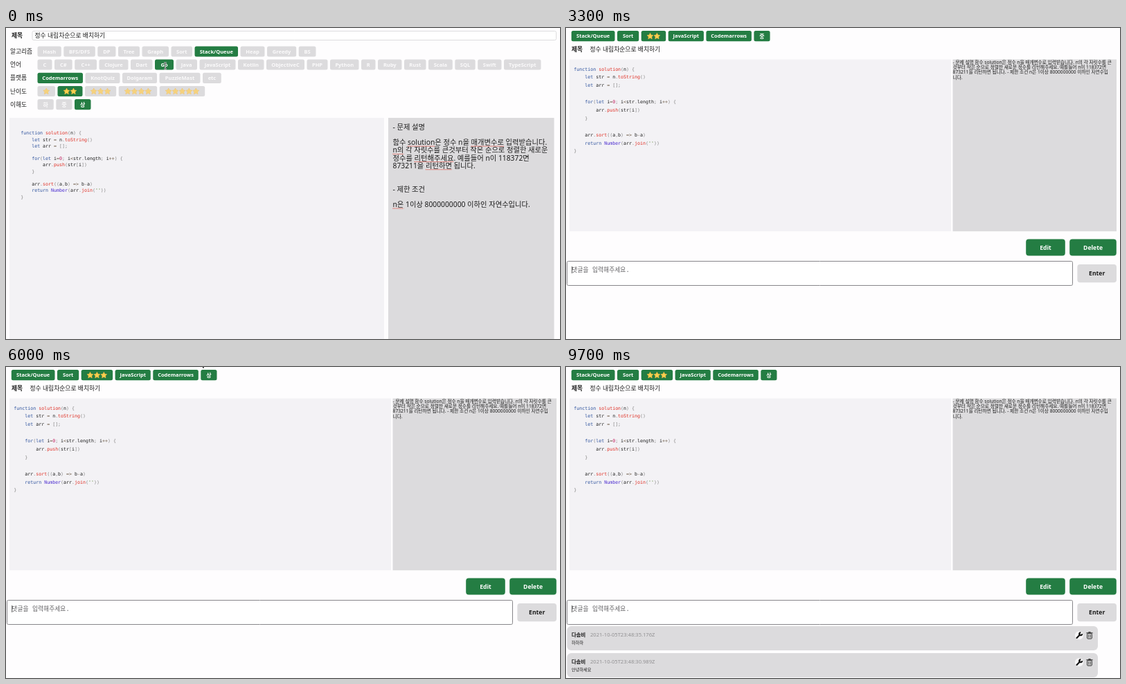
Recreate the animation shown at these times as an HTML page with a canvas. Size 800 by 450 pixels, loop 9.8 s.

```html
<!DOCTYPE html>
<html lang="ko">
<head>
<meta charset="utf-8">
<title>문제 풀이 노트</title>
<style>
html, body { margin: 0; width: 100%; height: 100%; overflow: hidden; background: #fefdfe; }
canvas { display: block; width: 800px; height: 450px; }
</style>
</head>
<body>
<canvas id="stage"></canvas>
<script>
const canvas = document.getElementById('stage');
const ctx = canvas.getContext('2d');
const dpr = window.devicePixelRatio || 1;
canvas.width = 800 * dpr;
canvas.height = 450 * dpr;

const LOOP = 9800, STEP = 100;
const SANS = '"Noto Sans", "Noto Sans CJK KR", sans-serif';
const MONO = '"DejaVu Sans Mono", "Noto Sans CJK KR", monospace';
const GREEN = '#247d43', GRAY = '#dcdbdd', PALE = '#f3f2f5', PAGE = '#fefdfe', INK = '#1c1c1c';
const TITLE = '정수 내림차순으로 배치하기';
const SITE = 'Codemarrows', USER = '다솜비';

// Each row: label, centre y, items, left edges (the last one closes the row)
const GAP = 3.5;
const ROWS = [
  ['알고리즘', 34, 'Hash BFS/DFS DP Tree Graph Sort Stack/Queue Heap Greedy BS'.split(' '),
    [45.5, 83.3, 132.3, 162, 196.5, 238.5, 272.5, 338.5, 377, 422.7, 451]],
  ['언어', 53, 'C C# C++ Clojure Dart Go Java JavaScript Kotlin ObjectiveC PHP Python R Ruby Rust Scala SQL Swift TypeScript'.split(' '),
    [45.5, 70, 99.2, 134.5, 180, 215, 245.5, 279.5, 335, 376, 434.5, 468, 513, 537, 575, 610, 648.3, 681.2, 719, 776]],
  ['플랫폼', 72.3, [SITE, 'KnotQuiz', 'Dolgaram', 'PuzzleMast', 'etc'],
    [45.5, 114.5, 168, 221.5, 284, 314.3]],
  ['난이도', 91.5, [1, 2, 3, 4, 5], [45.5, 74.5, 114, 162.7, 221.7, 290.7]],
  ['이해도', 110.7, ['하', '중', '상'], [45.5, 72.3, 99, 126]]
];

const CODE = [
  'function solution(n) {', '    let str = n.toString()', '    let arr = [];', '',
  '    for(let i=0; i<str.length; i++) {', '        arr.push(str[i])', '    }', '',
  '    arr.sort((a,b) => b-a)', "    return Number(arr.join(''))", '}'
];
const TOKEN = /\b(function|let|for|return)\b|(Number)|(\w+(?=\())|(\d+)|('')|([{}()\[\];,.])|([=<>+-]+)|\w+/g;
const TOKEN_COLORS = ['#31559f', '#4a2bd0', '#e02f24', '#c2205e', '#4a7a20', '#858585', '#6e5c48'];

const NOTE = [
  '- 문제 설명', '', '함수 solution은 정수 n을 매개변수로 입력받습니다.',
  'n의 각 자릿수를 큰것부터 작은 순으로 정렬한 새로운',
  '정수를 리턴해주세요. 예를들어 n이 118372면', '873211을 리턴하면 됩니다.', '', '',
  '- 제한 조건', '', 'n은 1이상 8000000000 이하인 자연수입니다.'
];
const MISSPELT = [[2, 'solution'], [2, '매개변수로'], [3, 'n의'], [4, '리턴해주세요'], [5, '리턴하면'], [10, 'n은']];
const SUMMARY = [
  '- 문제 설명 함수 solution은 정수 n을 매개변수로 입력받습니다. n의 각 자릿수를 큰',
  '것부터 작은 순으로 정렬한 새로운 정수를 리턴해주세요. 예를들어 n이 118372면',
  '873211을 리턴하면 됩니다. - 제한 조건 n은 1이상 8000000000 이하인 자연수입', '니다.'
];

const HELLO = ['ㅇ', '아', '안', '안ㄴ', '안녀', '안녕', '안녕ㅎ', '안녕하', '안녕핫', '안녕하세', '안녕하셍', '안녕하세요'];
const LAUGH = ['ㅎ', '하', '핳', '하하', '하핳', '하하하'];

// Pointer tracks: [time, x, y, shape]
const TRACKS = [
  [[0, 230, 55, 'beam'], [200, 230, 55, 'beam'], [500, 304, 54, 'beam'], [700, 304, 54, 'beam'],
    [1000, 254, 35, 'beam'], [1200, 254, 35, 'beam'], [1500, 84, 112, 'beam'], [1700, 84, 112, 'beam'],
    [2200, 628, 236, 'beam'], [2500, 628, 236, 'beam'], [3000, 700, 188, 'beam']],
  [[3600, 700, -14, 'arrow'], [4000, 692, 319, 'hand'], [4200, 692, 319, 'hand']],
  [[4300, 682, 313, 'beam'], [4400, 682, 313, 'beam'], [4700, 137, 92, 'beam'], [4800, 137, 92, 'beam'],
    [5000, 111, 111, 'arrow'], [5100, 230, 10, 'arrow']],
  [[5700, 280, -16, 'arrow'], [6000, 281, -8.6, 'arrow'], [6200, 285, -16, 'arrow']],
  [[7200, 560, 250, 'arrow'], [7400, 779, 358, 'hand'], [8500, 779, 358, 'hand']]
];

function write(str, x, y, size, color = INK, opt = {}) {
  ctx.font = (opt.bold ? 'bold ' : '') + size + 'px ' + (opt.font || SANS);
  ctx.textAlign = opt.align || 'left';
  ctx.fillStyle = color;
  ctx.fillText(str, x, y + size * 0.36);
}

function widthOf(str, size, font = SANS) {
  ctx.font = size + 'px ' + font;
  return ctx.measureText(str).width;
}

function rect(x, y, w, h, color) {
  ctx.fillStyle = color;
  ctx.fillRect(x, y, w, h);
}

function box(x, y, w, h, r, fill, stroke) {
  ctx.beginPath();
  ctx.roundRect(x, y, w, h, r);
  if (fill) { ctx.fillStyle = fill; ctx.fill(); }
  if (stroke) { ctx.strokeStyle = stroke; ctx.lineWidth = 1; ctx.stroke(); }
}

function shape(points, fill, stroke, width = 1) {
  ctx.beginPath();
  points.forEach(([x, y], i) => i ? ctx.lineTo(x, y) : ctx.moveTo(x, y));
  ctx.closePath();
  ctx.lineJoin = 'round';
  if (stroke) { ctx.strokeStyle = stroke; ctx.lineWidth = width; ctx.stroke(); }
  if (fill) { ctx.fillStyle = fill; ctx.fill(); }
}

function star(cx, cy, on) {
  const points = Array.from({ length: 10 }, (_, i) => {
    const a = -Math.PI / 2 + i * Math.PI / 5, r = i % 2 ? 2.3 : 4.6;
    return [cx + r * Math.cos(a), cy + 0.3 + r * Math.sin(a)];
  });
  shape(points, on ? '#fbd04e' : '#f6d27c', on ? '#eda93a' : '#ecc06c', 0.8);
}

function pill(label, x, cy, w, on) {
  box(x, cy - 7.6, w, 15.2, 2.5, on ? GREEN : GRAY);
  const mid = x + w / 2;
  if (typeof label === 'number') {
    for (let i = 0; i < label; i++) star(mid + (i - (label - 1) / 2) * 9.9, cy, on);
  } else {
    write(label, mid, cy, /[가-힣]/.test(label) ? 8 : 7.5, on ? '#fff' : '#fbfafb', { bold: true, align: 'center' });
  }
}

function code(x, y, pitch) {
  const size = 6.64, step = widthOf('0', size, MONO);
  CODE.forEach((line, row) => {
    for (const m of line.matchAll(TOKEN)) {
      const kind = m.slice(1).findIndex(Boolean);
      write(m[0], x + m.index * step, y + row * pitch, size, TOKEN_COLORS[kind] || INK, { font: MONO });
    }
  });
}

function squiggle(line, word, x, y, size) {
  const left = x + widthOf(line.slice(0, line.indexOf(word)), size);
  const w = widthOf(word, size);
  ctx.strokeStyle = '#e0483c';
  ctx.lineWidth = 1;
  ctx.setLineDash([1.3, 0.9]);
  ctx.beginPath();
  ctx.moveTo(left, y);
  ctx.lineTo(left + w, y);
  ctx.stroke();
  ctx.setLineDash([]);
}

function formPage(chosen, editing) {
  write('제목', 8, 11, 8.7, INK, { bold: true });
  box(38, 4.5, 756.5, 13, 2, '#fff', '#dddcde');
  write(TITLE, 41.5, 11, 8.8);
  if (editing) {
    squiggle(TITLE, '내림차순으로', 41.5, 15.6, 8.8);
    rect(42 + widthOf(TITLE, 8.8), 6, 0.8, 10, '#222');
  }
  for (const [label, y, items, xs] of ROWS) {
    write(label, 6, y, 8.7);
    items.forEach((item, i) => pill(item, xs[i], y, xs[i + 1] - xs[i] - GAP, chosen.includes(item)));
  }
  rect(5, 130, 541, 320, PALE);
  rect(552, 130, 239.5, 320, GRAY);
  if (editing) code(17.7, 150.2, 11.88);
  else code(21.2, 152, 9.22);
  NOTE.forEach((line, i) => write(line, 558.5, 143 + i * 11.25, 10.3));
  if (!editing) for (const [i, word] of MISSPELT) squiggle(NOTE[i], word, 558.5, 148.6 + i * 11.25, 10.3);
}

function button(label, x, y, w, h, fill, color) {
  box(x, y, w, h, 4, fill);
  write(label, x + w / 2, y + h / 2 + 0.2, 8.6, color, { bold: true, align: 'center' });
}

function wrench(x, y) {
  ctx.fillStyle = '#f8f7f8';
  ctx.beginPath();
  ctx.arc(x, y, 6, 0, 7);
  ctx.fill();
  ctx.strokeStyle = '#111';
  ctx.lineCap = 'round';
  ctx.lineWidth = 2.1;
  ctx.beginPath();
  ctx.moveTo(x - 3.4, y + 3.6);
  ctx.lineTo(x + 1.2, y - 1);
  ctx.stroke();
  ctx.lineCap = 'butt';
  ctx.beginPath();
  ctx.arc(x + 2.2, y - 2, 2, -0.1, 4.8);
  ctx.stroke();
}

function trash(x, y) {
  box(x - 3.3, y - 2.6, 6.6, 7.4, 1, '#f1f0f1', '#222');
  rect(x - 4.6, y - 4, 9.2, 1.1, '#222');
  rect(x - 1.6, y - 5.1, 3.2, 1.1, '#222');
  for (const dx of [-1.5, 0, 1.5]) rect(x + dx - 0.35, y - 1.2, 0.7, 4.6, '#333');
}

function comment(y, stamp, body) {
  box(1.5, y, 766.5, 35, 6, GRAY);
  write(USER, 8, y + 12.7, 7.4, INK, { bold: true });
  write(stamp, 35, y + 12.7, 7.6, '#919092');
  write(body, 8, y + 23.8, 6.2);
  wrench(741, y + 13.3);
  trash(756, y + 13.3);
}

function viewPage(stars, grasp, input, caret, comments) {
  let x = 7.8;
  const tags = [['Stack/Queue', 62.7], ['Sort', 31.2], [stars, stars * 9.9 + 15.7], ['JavaScript', 51.2], [SITE, 65.5], [grasp, 23.2]];
  for (const [label, w] of tags) {
    pill(label, x, 11.7, w, true);
    x += w + GAP;
  }
  write('제목', 8, 31, 8.7, INK, { bold: true });
  write(TITLE, 34.5, 31, 8.8);
  rect(5, 45.5, 551, 248.7, PALE);
  rect(558.5, 45.5, 236.5, 248.7, GRAY);
  code(11.3, 59.2, 11.88);
  SUMMARY.forEach((line, i) => write(line, 558.6, 49.5 + i * 7.3, 6.65));
  button('Edit', 664.2, 305.6, 56.6, 23.8, GREEN, '#fff');
  button('Delete', 727.2, 305.6, 67.6, 23.8, GREEN, '#fff');
  box(1.5, 337.5, 730, 35, 2, '#fff', '#87868a');
  write(input || '댓글을 입력해주세요.', 8.3, 350, 8.8, input ? INK : '#626164', { font: MONO });
  if (caret) rect(8.4 + widthOf(input, 8.8, MONO), 345, 0.8, 10, '#222');
  button('Enter', 738.4, 342, 56.6, 26.2, GRAY, INK);
  comments.forEach(([stamp, body], i) => comment(375 + i * 39, stamp, body));
}

function pointerAt(t) {
  for (const track of TRACKS) {
    if (t < track[0][0] || t > track[track.length - 1][0]) continue;
    const i = Math.max(1, track.findIndex(k => k[0] >= t));
    const a = track[i - 1], b = track[i];
    const p = (t - a[0]) / (b[0] - a[0]), e = p * p * (3 - 2 * p);
    return [a[1] + (b[1] - a[1]) * e, a[2] + (b[2] - a[2]) * e, p < 1 ? a[3] : b[3]];
  }
  return null;
}

function beam() {
  for (const [color, width] of [['#fff', 2], ['#333', 0.9]]) {
    ctx.strokeStyle = color;
    ctx.lineWidth = width;
    ctx.beginPath();
    ctx.moveTo(-1.8, -4.8);
    ctx.quadraticCurveTo(0, -4.6, 0, -3.2);
    ctx.lineTo(0, 3.2);
    ctx.quadraticCurveTo(0, 4.6, -1.8, 4.8);
    ctx.moveTo(1.8, -4.8);
    ctx.quadraticCurveTo(0, -4.6, 0, -3.2);
    ctx.moveTo(0, 3.2);
    ctx.quadraticCurveTo(0, 4.6, 1.8, 4.8);
    ctx.stroke();
  }
}

function hand() {
  shape([[0, 0], [1.4, 0.2], [1.8, 3.6], [3.3, 3.4], [4.8, 4], [6.3, 4.6], [7, 6], [6.4, 8.4], [5.6, 10.5],
    [1.2, 10.5], [-0.8, 7.8], [-2.2, 5.6], [-1.2, 4.9], [0.2, 6.2], [-0.6, 0.7]], '#fff', '#222', 1.4);
  for (const x of [2.3, 3.6, 4.9]) rect(x, 6.5, 0.5, 2.6, '#555');
}

function arrow() {
  shape([[0, 0], [0, 9], [2.1, 7.1], [3.5, 10.4], [5, 9.8], [3.6, 6.5], [6.4, 6.4]], '#111', '#fff', 1.4);
}

const POINTERS = { beam, hand, arrow };

function typed(steps, start, end, t) {
  if (t < start) return '';
  const i = Math.floor((t - start) / (end - start) * (steps.length - 1));
  return steps[Math.min(steps.length - 1, i)];
}

function scene(t) {
  if (t < 3300) {
    const chosen = ['Stack/Queue', SITE, 2, t < 600 ? 'Go' : 'JavaScript', t < 1600 ? '상' : '중'];
    if (t >= 1100) chosen.push('Sort');
    formPage(chosen, false);
  } else if (t < 4300) {
    viewPage(2, '중', '', true, []);
  } else if (t < 5500) {
    formPage(['Stack/Queue', 'Sort', 'JavaScript', SITE, t < 4700 ? 2 : 3, t < 5000 ? '중' : '상'], true);
  } else {
    const comments = [];
    if (t >= 8300) comments.push(['2021-10-05T23:48:30.989Z', '안녕하세요']);
    if (t >= 9300) comments.unshift(['2021-10-05T23:48:35.176Z', '하하하']);
    let input = '';
    if (t < 8300) input = typed(HELLO, 6500, 7100, t);
    else if (t < 9300) input = typed(LAUGH, 8600, 9100, t);
    viewPage(3, '상', input, t < 7200 || t >= 8300, comments);
  }
}

function draw(t) {
  ctx.setTransform(dpr, 0, 0, dpr, 0, 0);
  rect(0, 0, 800, 450, PAGE);
  scene(t);
  const pointer = pointerAt(t);
  if (pointer) {
    ctx.translate(pointer[0], pointer[1]);
    POINTERS[pointer[2]]();
  }
}

const begin = performance.now();
function tick() {
  const t = (performance.now() - begin) % LOOP;
  draw(Math.floor(t / STEP) * STEP);
  requestAnimationFrame(tick);
}
tick();
</script>
</body>
</html>
```
